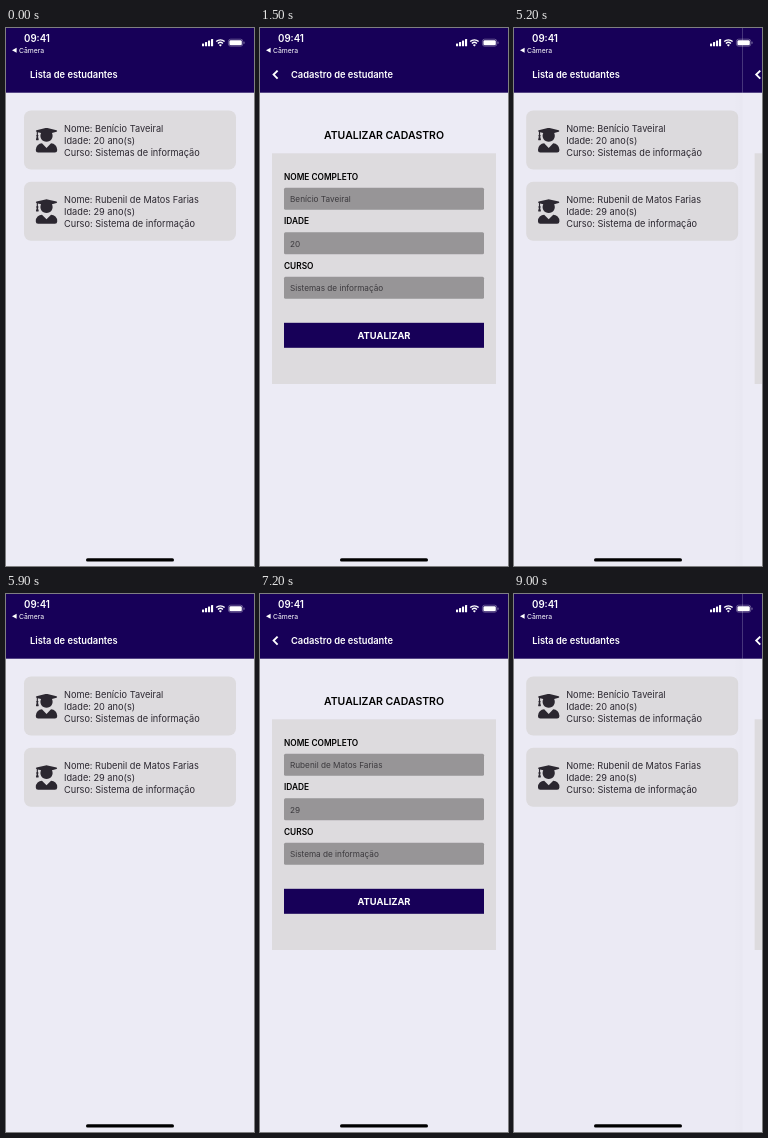
Write an HTML page that moves like this. It is 248 px wide and 538 px high and loops after 9100 ms.

```html
<!DOCTYPE html>
<html lang="pt-BR">
<head>
<meta charset="utf-8">
<title>Lista de estudantes</title>
<style>
  html, body { margin: 0; width: 100%; height: 100%; overflow: hidden; background: #ecebf5; }
  svg { display: block; width: 100%; height: 100%; font-family: Inter, "Liberation Sans", sans-serif; }
  .bar { fill: #170058; }
  .panel { fill: #dddbde; }
  .bold { font-weight: 600; }
  .strong { font-weight: 700; }
  .white { fill: #fff; }
  .ink { fill: #2b2730; }
  .input { fill: #979597; }
  .value { fill: #3b393d; }
</style>
</head>
<body>
<svg viewBox="0 0 248 538">
  <defs>
    <linearGradient id="edge">
      <stop offset="0" stop-color="#000" stop-opacity="0"/>
      <stop offset="1" stop-color="#000" stop-opacity=".14"/>
    </linearGradient>
    <path id="graduate" d="M319 321 224 416 129 321A134 134 0 0 0 0 454V464a48 48 0 0 0 48 48H400a48 48 0 0 0 48-48V454A134 134 0 0 0 319 321Z
      M14 80l6 1v59a23 23 0 0 0-1 40L3 242q-1 14 8 14h42q8 0 8-14L45 180a23 23 0 0 0-1-40V87l66 16a128 128 0 1 0 228 0l96-23q27-16 0-32L244 2q-20-4-40 0L14 48q-27 16 0 32Z"/>
  </defs>
  <g id="list"></g>
  <rect id="dim" width="248" height="538"/>
  <g id="form"></g>
  <g id="status" class="white">
    <text x="18" y="14.3" font-size="9.7" class="bold">09:41</text>
    <path d="M6 22.2 10.6 19.7V24.7Z"/>
    <text x="13" y="24.6" font-size="6.8">Câmera</text>
    <rect x="196" y="15.4" width="2.1" height="2.8" rx=".5"/>
    <rect x="199" y="14" width="2.1" height="4.2" rx=".5"/>
    <rect x="202" y="12.5" width="2.1" height="5.7" rx=".5"/>
    <rect x="205" y="11" width="2.1" height="7.2" rx=".5"/>
    <g fill="none" stroke="#fff" stroke-width="1.4">
      <path d="M210.2 13.6a6 6 0 0 1 8.4 0M211.9 15.4a3.6 3.6 0 0 1 5 0"/>
    </g>
    <path d="M214.4 18.4 212.9 16.9a2.1 2.1 0 0 1 3 0Z"/>
    <rect x="222.4" y="11.2" width="14.4" height="7" rx="2.2" fill="none" stroke="#fff" stroke-opacity=".45" stroke-width=".7"/>
    <rect x="223.4" y="12.2" width="12.4" height="5" rx="1.3"/>
    <rect x="237.6" y="13.6" width=".9" height="2.2" rx=".4" opacity=".5"/>
  </g>
  <rect x="80" y="530.3" width="88" height="3.2" rx="1.6" fill="#000"/>
</svg>
<script>
const LOOP = 9100, STEP = 100, WIDTH = 248;
const students = [
  { name: 'Benício Taveiral', age: 20, course: 'Sistemas de informação' },
  { name: 'Rubenil de Matos Farias', age: 29, course: 'Sistema de informação' }
];
const visits = [
  { press: 500, release: 700, open: 720, close: 4970 },
  { press: 6300, release: 6500, open: 6500, close: 8770 }
];
const REVEAL = 600, PRESSED = 0.7;

const $ = id => document.getElementById(id);
const clamp = v => Math.max(0, Math.min(1, v));
const text = (x, y, size, cls, str, extra = '') =>
  `<text x="${x}" y="${y}" font-size="${size}" class="${cls}" ${extra}>${str}</text>`;
const rect = (x, y, w, h, cls, rx = 0) =>
  `<rect x="${x}" y="${y}" width="${w}" height="${h}" class="${cls}" rx="${rx}"/>`;
const page = '<rect width="248" height="538" fill="#ecebf5"/>' + rect(0, 0, WIDTH, 64.7, 'bar');

function card({ name, age, course }, i) {
  const lines = [`Nome: ${name}`, `Idade: ${age} ano(s)`, `Curso: ${course}`];
  return `<g id="card${i}" transform="translate(0 ${i * 71.3})">`
    + rect(18, 82.5, 212, 59, 'panel', 7)
    + '<use href="#graduate" class="ink" transform="translate(29.8 100) scale(.0478)"/>'
    + lines.map((s, n) => text(58, 104 + n * 11.75, 9.2, 'ink', s)).join('')
    + '</g>';
}

function field(label, i) {
  const y = i * 44.5;
  return text(24, 151.6 + y, 8.3, 'bold', label)
    + rect(24, 159.8 + y, 200, 22, 'input', 1.5)
    + text(30, 174 + y, 8.2, 'value', '', `id="value${i}"`);
}

$('list').innerHTML = page
  + text(24, 50, 9.3, 'bold white', 'Lista de estudantes')
  + students.map(card).join('');

$('form').innerHTML = '<rect id="shadow" x="-9" width="9" height="538" fill="url(#edge)"/>' + page
  + '<path d="M17.6 42.6 13.6 46.6 17.6 50.6" fill="none" stroke="#fff" stroke-width="1.9"/>'
  + text(31, 50, 9.3, 'bold white', 'Cadastro de estudante')
  + '<use id="loader" href="#graduate" class="ink" transform="translate(114 98) scale(.044)"/>'
  + '<g id="fields">'
  + text(124, 111.2, 10.5, 'bold', 'ATUALIZAR CADASTRO', 'text-anchor="middle"')
  + rect(12, 125.3, 224, 230.7, 'panel')
  + ['NOME COMPLETO', 'IDADE', 'CURSO'].map(field).join('')
  + rect(24, 294.8, 200, 25, 'bar')
  + text(124, 311, 9.3, 'strong white', 'ATUALIZAR', 'text-anchor="middle"')
  + '</g>';

// Critically damped spring from 0 to 1
function spring(ms) {
  const x = Math.sqrt(1000 / 3) * Math.max(0, ms) / 1000;
  return x > 11 ? 1 : 1 - (1 + x) * Math.exp(-x);
}

function cardOpacity(t, { press, release }) {
  if (t < press) return 1;
  return PRESSED + (1 - PRESSED) * clamp((t - release) / 250);
}

function render(t) {
  const active = t < 6000 ? 0 : 1;
  const { open, close } = visits[active];
  const shown = t < close ? spring(t - open) : 1 - spring(t - close);
  const { name, age, course } = students[active];

  $('list').setAttribute('transform', `translate(${-0.3 * WIDTH * shown} 0)`);
  $('form').setAttribute('transform', `translate(${WIDTH * (1 - shown)} 0)`);
  $('form').setAttribute('visibility', shown > 0 ? 'visible' : 'hidden');
  $('dim').setAttribute('opacity', 0.07 * shown);
  $('shadow').setAttribute('opacity', shown);

  const loaded = t - open >= REVEAL;
  $('fields').setAttribute('display', loaded ? 'inline' : 'none');
  $('loader').setAttribute('display', loaded ? 'none' : 'inline');
  $('loader').setAttribute('opacity', 0.06 * clamp((t - open - 150) / 150));

  [name, age, course].forEach((v, i) => { $('value' + i).textContent = v; });
  visits.forEach((v, i) => $('card' + i).setAttribute('opacity', cardOpacity(t, v)));
}

const start = performance.now();
function tick() {
  const t = (performance.now() - start) % LOOP;
  render(Math.floor(t / STEP) * STEP);
  requestAnimationFrame(tick);
}
tick();
</script>
</body>
</html>
```
